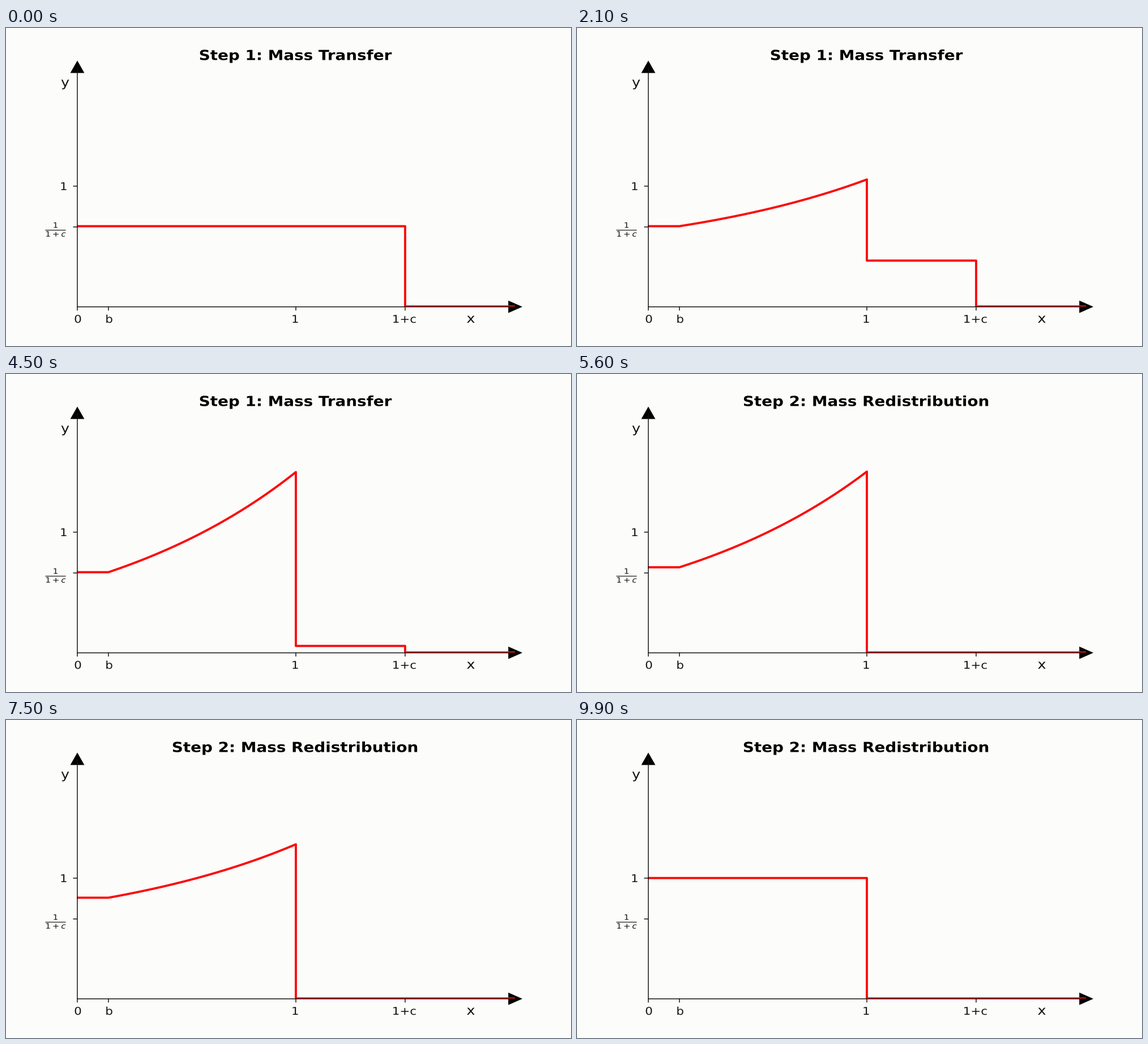
A matplotlib script for the animation above (10 s loop, 998 by 561 pixels).

```python
import numpy as np
import matplotlib.pyplot as plt
from matplotlib.animation import FuncAnimation
from matplotlib.patches import PathPatch, Polygon, Rectangle
from matplotlib.textpath import TextPath
from matplotlib.transforms import Affine2D

W, H, DPI = 998, 561, 64
FRAMES, INTERVAL = 100, 100
HALF = FRAMES // 2

# Pixels per point: the whole picture is wider than tall in scale
SX, SY = 2.14, 1.885
X0, Y0 = 126, 491.3
UX, UY = 386, 212.5
RIGHT, TOP = 899, 69
INK = "#141414"

C = 0.5
LOW = 1 / (1 + C)
# b solves exp(1-b) - 1 - (1-b) = c, so the moved mass is conserved
u = 1.0
for _ in range(20):
    u -= (np.exp(u) - 1 - u - C) / (np.exp(u) - 1)
B = 1 - u

plt.rcParams["path.snap"] = False
fig = plt.figure(figsize=(W / DPI, H / DPI), dpi=DPI, facecolor="#fcfcfb")
ax = fig.add_axes([0, 0, 1, 1])
ax.set_xlim(0, W)
ax.set_ylim(H, 0)
ax.axis("off")


def px(x):
    return X0 + UX * np.asarray(x)


def py(y):
    return Y0 - UY * np.asarray(y)


def width(pixels):
    return pixels * 72 / DPI


def label(text, x, base, size, weight="normal", color=INK, middle=False):
    """Text centred on x, standing on base or centred on it."""
    glyphs = TextPath((0, 0), text, size=size,
                      prop={"family": "DejaVu Sans", "weight": weight})
    box = glyphs.get_extents()
    shift_y = -(box.y0 + box.y1) / 2 if middle else 0
    place = (Affine2D().translate(-(box.x0 + box.x1) / 2, shift_y)
             .scale(SX, -SY).translate(x, base))
    patch = PathPatch(place.transform_path(glyphs), fc=color, lw=0, zorder=4)
    return ax.add_patch(patch)


def stroke(xs, ys, w=1.5):
    ax.plot(xs, ys, color=INK, lw=width(w), solid_capstyle="butt", zorder=3)


# Axes, ticks and arrow heads
stroke([X0, X0], [Y0 + 1, TOP])
stroke([X0, RIGHT], [Y0 + 0.6, Y0 + 0.6])
for x in (0, B, 1, 1 + C):
    stroke([px(x)] * 2, [Y0, Y0 + 3.5 * SY + 0.5])
for y in (279, 351):
    stroke([X0, X0 - 3.5 * SX], [y, y])

TIP, BACK, SIDE = 6.12, 5.5, 5.81
heads = [
    [(X0, TOP - TIP * SY), (X0 - SIDE * SX, TOP + BACK * SY),
     (X0 + SIDE * SX, TOP + BACK * SY)],
    [(RIGHT + TIP * SX, Y0 + 0.5), (RIGHT - BACK * SX, Y0 + 0.5 - SIDE * SY),
     (RIGHT - BACK * SX, Y0 + 0.5 + SIDE * SY)],
]
for points in heads:
    ax.add_patch(Polygon(points, fc="black", lw=0, zorder=1))

# Labels
for text, x in (("0", 127), ("b", 182.5), ("1", 511), ("1+c", 704)):
    label(text, x, 520, 10)
label("1", 102, 286, 10)
label(r"$\frac{1}{1+c}$", 87.5, 355.5, 10, middle=True)
label("x", 821, 520, 12)
label("y", 104.5, 103.5, 12)

titles = [
    label("Step 1: Mass Transfer", 512, 56.5, 13, "bold", "black"),
    label("Step 2: Mass Redistribution", 510.5, 56.5, 13, "bold", "black"),
]

# Density curve
grid = np.linspace(B, 1, 80)
growth = LOW * np.exp(grid - B)
xs = np.concatenate([[0], grid, [1, 1 + C, 1 + C, 2.1]])
curve, = ax.plot([], [], color="#fb0a0a", lw=width(3.9), zorder=2)
curve.set_clip_path(Rectangle((X0 - 0.5, TOP), RIGHT - X0 + 0.5, Y0 + 1 - TOP,
                              transform=ax.transData))


def draw(i):
    step, k = divmod(i % FRAMES, HALF)
    p = k / (HALF - 1)
    if step == 0:
        flat, tail = LOW, LOW * (1 - p)
        rise = LOW + (growth - LOW) * p
    else:
        flat, tail = LOW + (1 - LOW) * p, 0
        rise = growth + (1 - growth) * p
    ys = np.concatenate([[flat], rise, [tail, tail, 0, 0]])
    curve.set_data(px(xs), py(ys))
    for n, title in enumerate(titles):
        title.set_visible(n == step)
    return [curve, *titles]


anim = FuncAnimation(fig, draw, frames=FRAMES, interval=INTERVAL,
                     init_func=lambda: draw(0), repeat=True, repeat_delay=0)
plt.show()
```
